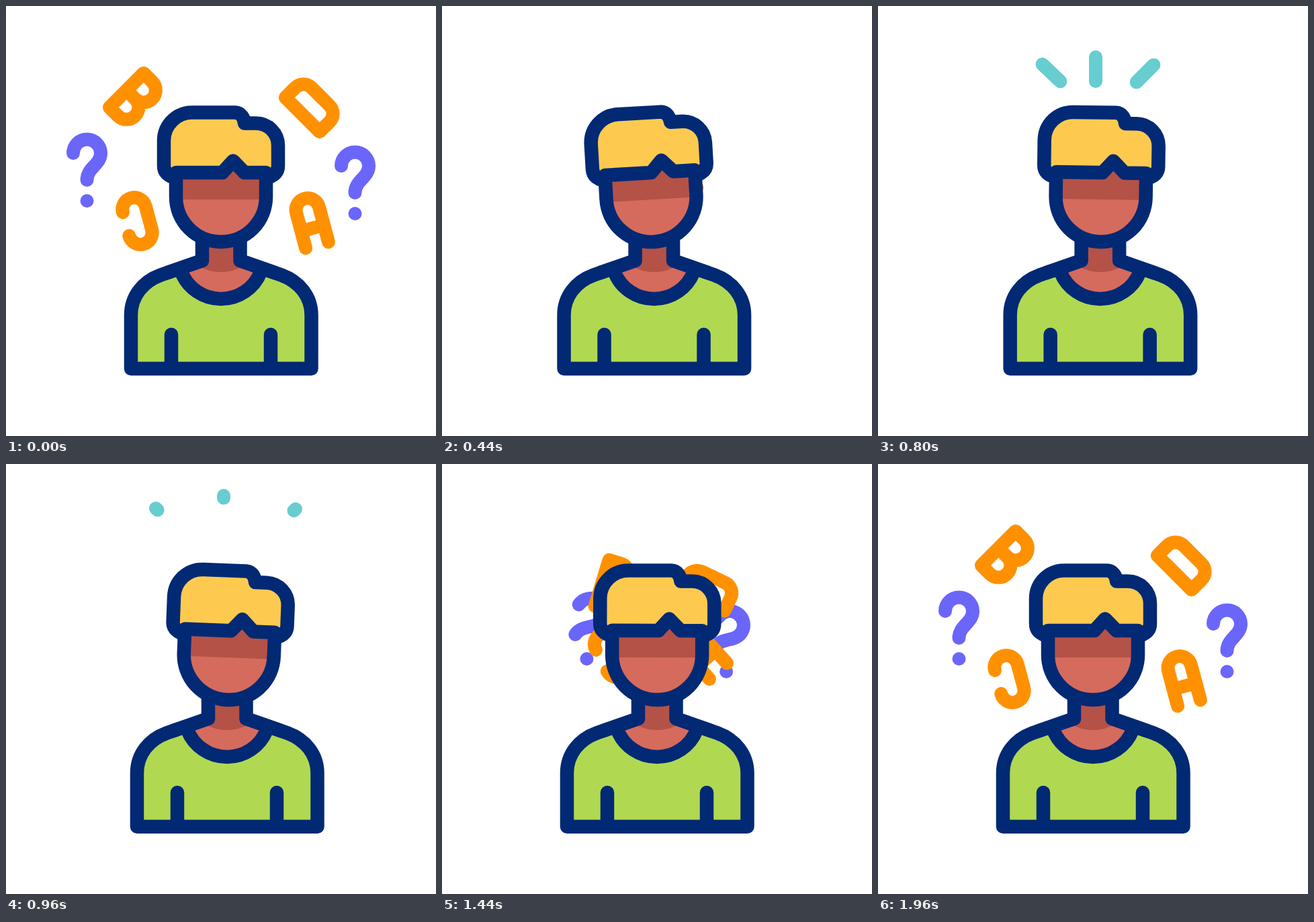
An HTML page for the animation above (2040 ms loop, 640 by 640 pixels).

```html
<!DOCTYPE html>
<html lang="en">
<head>
<meta charset="utf-8">
<title>Puzzled person</title>
<style>
  html, body { margin: 0; height: 100%; overflow: hidden; background: #fff; }
  svg { display: block; width: 100vw; height: 100vh; }
  g { fill: none; stroke-width: 20; stroke-linecap: round; stroke-linejoin: round; }
  .purple { stroke: #6b66fa; }
  .orange { stroke: #ff9100; }
  .teal { stroke: #67cdd1; }
  .navy, .navy g { stroke: #022974; stroke-width: 20.5; }
  .fill { stroke: none; }
  .skin { fill: #d56b5d; }
  .shade { fill: #b45247; }
  .green { fill: #b0d951; }
  .hair { fill: #fdca4f; }
</style>
</head>
<body>
<svg viewBox="0 0 640 640">
  <g id="symbols"></g>
  <g id="rays" class="teal"></g>
  <g id="body" class="navy">
    <path class="green" d="M292 379L230 400.500C204 410 186 432 186 460V539.700H454.500V460C454.500 432 436 410 410 400.500L348.500 379Z"/>
    <path class="fill skin" d="M292 340H348V379L380 394A63.5 63.5 0 0 1 260 394L292 379Z"/>
    <path class="fill shade" d="M284 386Q320 406 356 386V345H284Z"/>
    <path d="M292 345V379L240 397M348.500 345V379L400 397M261 396A63.5 63.5 0 0 0 379 396M246 489V539M394 489V539"/>
    <g id="head">
      <path class="fill skin" d="M253 248V284A67 67 0 0 0 387 284V248Z"/>
      <path class="fill shade" d="M253 225H387V288H253Z"/>
      <path d="M253 248V284A67 67 0 0 0 387 284V248"/>
      <path class="fill hair" d="M235 248V200A42 42 0 0 1 277 158.500H341Q352 160 354 174H372A33 33 0 0 1 405 207V248H355L338 230.500L322 248Z"/>
      <path d="M249 255Q235 250 235 238V200A42 42 0 0 1 277 158.500H341C350 159 354 166 355 174.500H372A33 33 0 0 1 405 208V238Q405 250 391 255M253 248H322L338 230.500L355 248H387"/>
    </g>
  </g>
</svg>
<script>
const LOOP = 2040, STEP = 40;
const $ = id => document.getElementById(id);

function add(parent, tag, attrs) {
  const el = document.createElementNS('http://www.w3.org/2000/svg', tag);
  for (const name in attrs) el.setAttribute(name, attrs[name]);
  return parent.appendChild(el);
}

const clamp = p => Math.min(1, Math.max(0, p));
const ease = (t, from, to) => (1 - Math.cos(Math.PI * clamp((t - from) / (to - from)))) / 2;

// Eased value between [time, value] keys
function along(t, keys) {
  let value = keys[0][1];
  for (let i = 1; i < keys.length; i++)
    value += (keys[i][1] - keys[i - 1][1]) * ease(t, keys[i - 1][0], keys[i][0]);
  return value;
}

const HOOK = 'M-20.5 -9.5a20.5 20.5 0 0 1 41 0C20.5 8 0 12 0 30.5';
const DOT = 'M0 61.500h.01';

// x, y, travel to the centre, resting angle, extra turn
const symbols = [
  ['purple', HOOK, 120.5, 228.5, 202, 0, 0, 34],
  ['purple', DOT, 120.5, 228.5, 202, 0, 0, 0],
  ['purple', HOOK, 519.5, 247.5, -205, 0, 0, 34],
  ['purple', DOT, 519.5, 247.5, -205, 0, 0, 0],
  ['orange', 'M-15 0H3a18 18 0 0 0 0-36H-15V36H3a18 18 0 0 0 0-36', 190, 136, 133, 97, 45, -28],
  ['orange', 'M-18-36V36H3a17 17 0 0 0 17-17V-19a17 17 0 0 0-17-17Z', 454, 149, -124, 80, -45, -19.5],
  ['orange', 'M-17.5-18a17.5 17.5 0 0 1 35 0V18a17.5 17.5 0 0 1-35 0', 195.5, 320, 122, -76, -15, -13],
  ['orange', 'M-17.5 36V-18a17.5 17.5 0 0 1 35 0V36M-17.5 10H17.5', 453.7, 321, -142, -84, -15, -27]
].map(([cls, d, ...place]) => ({ el: add($('symbols'), 'path', { class: cls, d }), place }));

// inner x, y, outer x, y
const rays = [[293, 133, 223, 66], [324, 141, 324, 47], [364, 134, 431, 67]]
  .map(ends => ({ el: add($('rays'), 'path', {}), ends }));

function draw(t) {
  const x = along(t, [[0, 0], [240, 20.5], [600, -22], [840, 13], [1160, 0]]);
  const tilt = along(t, [[0, 0], [300, -3.8], [1080, 2.6], [1500, 0]]);
  $('body').setAttribute('transform', `translate(${x})`);
  $('head').setAttribute('transform', `rotate(${tilt} 320 355)`);

  const gather = t < 1000 ? ease(t, 0, 635) : (1 - clamp((t - 1240) / 720)) ** 2.32;
  const turn = ease(t, 0, 240) - ease(t, 1640, 1960);
  $('symbols').style.display = t >= 640 && t <= 1240 ? 'none' : '';
  for (const { el, place: [px, py, dx, dy, angle, spin] } of symbols)
    el.setAttribute('transform',
      `translate(${px + dx * gather} ${py + dy * gather}) rotate(${angle + spin * turn})`);

  const tip = ease(t, 600, 920), tail = ease(t, 680, 1000);
  $('rays').style.display = tip > tail ? '' : 'none';
  for (const { el, ends: [x1, y1, x2, y2] } of rays) {
    const at = p => `${x1 + (x2 - x1) * p} ${y1 + (y2 - y1) * p}`;
    el.setAttribute('d', `M${at(tail)}L${at(tip)}`);
  }
}

function tick() {
  const t = performance.now() % LOOP;
  draw(Math.floor(t / STEP) * STEP);
  requestAnimationFrame(tick);
}
tick();
</script>
</body>
</html>
```
